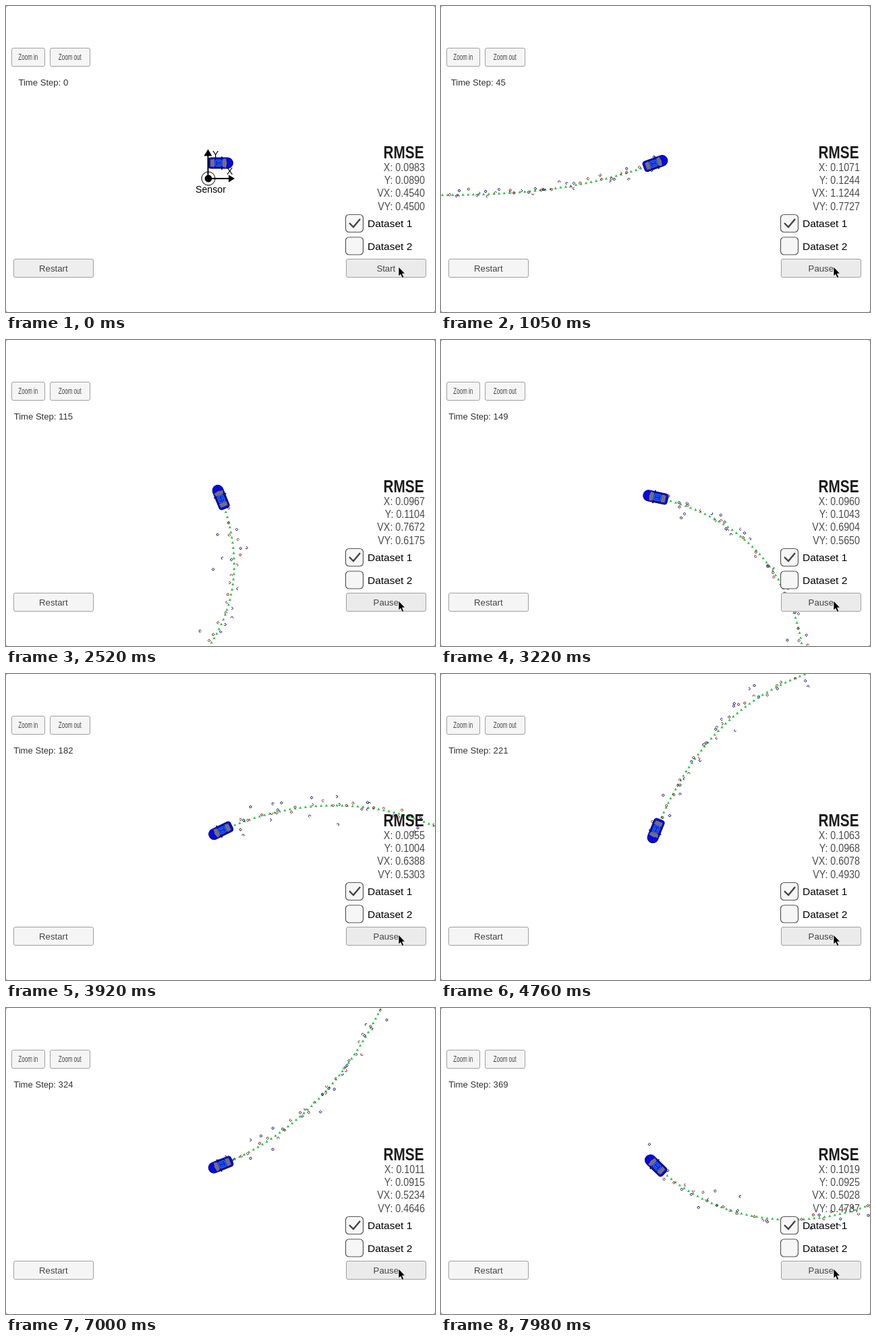
Animation of 636 by 454 pixels, one loop 8000 ms. Source, as an HTML page with a canvas:

```html
<!DOCTYPE html>
<html lang="en">
<head>
<meta charset="utf-8">
<title>Tracking simulator</title>
<style>
html, body { margin: 0; width: 100%; height: 100%; overflow: hidden; background: #fff; }
canvas { display: block; }
</style>
</head>
<body>
<canvas id="stage" width="636" height="454"></canvas>
<script>
const ctx = document.getElementById('stage').getContext('2d');
const LOOP = 8000, TICK = 70;
const CAR = { x: 318, y: 233 };
const STRIDE = 7.7, LAST = 369;
const FONT = '"Liberation Sans", Arial, sans-serif';
const AXES = ['X', 'Y', 'VX', 'VY'];

// Key moments: time in ms, time step, then the four RMSE values
const keys = [
  [1050, 45, 0.1071, 0.1244, 1.1244, 0.7727],
  [2520, 115, 0.0967, 0.1104, 0.7672, 0.6175],
  [3920, 182, 0.0955, 0.1004, 0.6388, 0.5303],
  [4760, 221, 0.1063, 0.0968, 0.6078, 0.4930],
  [6020, 278, 0.1000, 0.0902, 0.5502, 0.4448],
  [7980, 369, 0.1019, 0.0925, 0.5028, 0.4787]
];
const previousRun = [0.0983, 0.0890, 0.4540, 0.4500];

// Key headings: time step, degrees counter-clockwise
const headings = [[0, 0], [45, 20], [85, 57], [103, 92], [115, 112], [138, 153], [159, 180],
  [182, 206], [200, 229], [221, 248], [250, 251], [278, 246], [329, 196], [LAST, 136]];

function segment(table, x) {
  let i = 0;
  while (i < table.length - 2 && x > table[i + 1][0]) i++;
  return i;
}

function linear(table, x, col = 1) {
  const i = segment(table, x), a = table[i], b = table[i + 1];
  return a[col] + (b[col] - a[col]) * (x - a[0]) / (b[0] - a[0]);
}

// Cubic curve through the points, level at the first one
function smooth(table, x) {
  const slope = k => {
    const a = table[Math.max(k - 1, 0)], b = table[Math.min(k + 1, table.length - 1)];
    return k === 0 ? 0 : (b[1] - a[1]) / (b[0] - a[0]);
  };
  const i = segment(table, x), [x0, y0] = table[i], [x1, y1] = table[i + 1];
  const h = x1 - x0, u = (x - x0) / h, v = 1 - u;
  return v * v * (1 + 2 * u) * y0 + u * v * v * h * slope(i)
    + u * u * (3 - 2 * u) * y1 - u * u * v * h * slope(i + 1);
}

const clock = [[TICK, 1], ...keys];
const angle = s => smooth(headings, s) * Math.PI / 180;

// Summed squared errors run evenly between the key moments
const errors = [[0, 0, 0, 27, 0], ...keys.map(([, s, ...r]) => [s, ...r.map(v => s * v * v)])];
const errorAt = (step, i) => step ? Math.sqrt(linear(errors, step, i + 1) / step) : previousRun[i];

// Car positions relative to the sensor, with the drift of the summed steps removed
const path = [{ x: 18, y: -23 }];
for (let s = 1; s <= LAST; s++) {
  const a = angle(s - 0.5), p = path[s - 1];
  path.push({ x: p.x + STRIDE * Math.cos(a), y: p.y - STRIDE * Math.sin(a) });
}
const drift = { x: (-178 - path[278].x) / 278, y: (28 - path[278].y) / 278 };
path.forEach((p, s) => { p.x += drift.x * s; p.y += drift.y * s; });

let seed = 29;
function random() {
  seed = (seed * 16807) % 2147483647;
  return seed / 2147483647;
}
const gauss = () => (random() + random() + random() + random() - 2) * 1.7;

// Radar on odd steps errs in range and bearing, lidar on even steps in x and y
const readings = path.map(({ x, y }, s) => {
  const g = gauss(), h = gauss(), start = random() * 6.3, sweep = 3.6 + random() * 4;
  if (s % 2 === 0) return { x: x + 4 * g, y: y + 4 * h, start, sweep, color: '#7a1a1a' };
  const range = Math.hypot(x, y) + 7 * g, bearing = Math.atan2(y, x) + 0.026 * h;
  return { x: range * Math.cos(bearing), y: range * Math.sin(bearing), start, sweep, color: '#0c0c58' };
});

function text(str, x, y, size, { color = '#000', align = 'left', weight = '', squeeze = 1 } = {}) {
  ctx.save();
  ctx.translate(x, y);
  ctx.scale(squeeze, 1);
  ctx.font = `${weight} ${size}px ${FONT}`;
  ctx.textAlign = align;
  ctx.fillStyle = color;
  ctx.fillText(str, 0, 0);
  ctx.restore();
}

function shape(points, fill) {
  ctx.beginPath();
  points.forEach(([x, y]) => ctx.lineTo(x, y));
  ctx.closePath();
  ctx.fillStyle = fill;
  ctx.fill();
}

function box(x, y, w, h, r, fill, stroke, width = 1) {
  ctx.beginPath();
  ctx.roundRect(x, y, w, h, r);
  ctx.fillStyle = fill;
  ctx.fill();
  if (stroke) {
    ctx.strokeStyle = stroke;
    ctx.lineWidth = width;
    ctx.stroke();
  }
}

function line(points, color, width) {
  ctx.beginPath();
  points.forEach(([x, y]) => ctx.lineTo(x, y));
  ctx.strokeStyle = color;
  ctx.lineWidth = width;
  ctx.stroke();
}

function arc(x, y, r, start, sweep, color, width = 1) {
  ctx.beginPath();
  ctx.arc(x, y, r, start, start + sweep);
  ctx.strokeStyle = color;
  ctx.lineWidth = width;
  ctx.stroke();
}

function drawTrail(step) {
  for (let s = 1; s <= step; s++) {
    const { x, y } = path[s], r = readings[s];
    shape([[x, y - 2], [x + 2.1, y + 1.8], [x - 2.1, y + 1.8]], '#35c04c');
    arc(r.x, r.y, 1.6, r.start, r.sweep, r.color);
  }
}

function drawSensor() {
  arc(0, 0, 10, 0, 7, '#000');
  arc(0, 0, 2.7, 0, 7, '#000', 5.4);
  line([[-0.5, 0], [-0.5, -36]], '#000', 2);
  line([[0, 0], [32, 0]], '#000', 2);
  shape([[-0.5, -43.5], [5.5, -33.5], [-6.5, -33.5]], '#000');
  shape([[39, 0], [30, -5.5], [30, 5.5]], '#000');
  text('Y', 6, -31, 14);
  text('X', 27, -6, 14);
  text('Sensor', -19, 21, 14.2);
}

function drawCar(a) {
  ctx.save();
  ctx.translate(CAR.x, CAR.y);
  ctx.rotate(-a);
  box(1, -9.8, 2, 19.6, 0.5, '#101060');
  box(-18.5, -8, 37, 16, [4, 8, 8, 4], '#0808e0', '#0a0a70');
  shape([[-15, -5], [-9, -6], [-9, 6], [-15, 5]], '#70707c');
  shape([[3, -5.5], [8, -7], [9.5, 0], [8, 7], [3, 5.5]], '#70707c');
  box(-8, -4.5, 10, 9, 2, '#0a30d8', '#3a78f4');
  for (const side of [-1, 1]) {
    line([[-13, 6.8 * side], [5, 6.8 * side]], '#17174f', 1);
    line([[-5, 2 * side], [0, 2 * side]], '#3a78f4', 1);
  }
  ctx.restore();
}

function button(label, x, y, w, fill, { size = 13.2, dy = 18.5, squeeze = 1 } = {}) {
  box(x + 0.5, y + 0.5, w, 27, 2.5, fill, '#a0a0a0');
  text(label, x + w / 2 + 0.3, y + dy, size, { color: '#444', align: 'center', squeeze });
}

function checkbox(label, y, checked) {
  box(503.5, y, 26, 26, 5, '#f6f6f6', '#555', 1.2);
  if (checked) line([[509, y + 12.5], [515, y + 18.5], [525, y + 6.5]], '#444', 2.4);
  text(label, 536, y + 18.5, 15.5);
}

function drawPanel(step) {
  const narrow = { size: 12, dy: 18, squeeze: 0.67 };
  button('Zoom in', 8, 62, 49, '#f5f5f5', narrow);
  button('Zoom out', 65, 62, 59, '#f5f5f5', narrow);
  text('Time Step: ' + step, 55.3, 118, 13.1, { color: '#323232', align: 'center' });

  text('RMSE', 619.5, 225.5, 25, { align: 'right', squeeze: 0.83, color: '#1c1c1c', weight: 'bold' });
  AXES.forEach((name, i) => {
    const value = `${name}: ${errorAt(step, i).toFixed(4)}`;
    text(value, 621, 245 + 19.2 * i, 17, { align: 'right', squeeze: 0.84, color: '#4c4c4c' });
  });

  checkbox('Dataset 1', 309.5, true);
  checkbox('Dataset 2', 343, false);
  button('Restart', 11, 375, 118, step ? '#f5f5f5' : '#eeeeee');
  button(step ? 'Pause' : 'Start', 504, 375, 118, '#ebebeb');
}

function drawPointer() {
  const outline = [[582, 387], [582, 401], [585, 398.2], [587.5, 403.5], [589.8, 402.5],
    [587.4, 397.2], [591.5, 397]];
  shape(outline, '#000');
  line([...outline, outline[0]], '#fff', 0.7);
}

// Draws in sensor coordinates, with the car held at its place on the stage
function inWorld(here, paint) {
  ctx.save();
  ctx.translate(CAR.x - here.x, CAR.y - here.y);
  paint();
  ctx.restore();
}

function draw(time) {
  const t = Math.floor((time % LOOP) / TICK) * TICK;
  const step = t < TICK ? 0 : Math.round(linear(clock, t));
  const here = path[step];

  box(0, 0, 636, 454, 0, '#888');
  box(0, 0, 636, 454, 3, '#fff');
  inWorld(here, () => drawTrail(step));
  drawCar(angle(step));
  inWorld(here, drawSensor);
  drawPanel(step);
  drawPointer();
}

let begin;
function frame(now) {
  begin ??= now;
  draw(now - begin);
  requestAnimationFrame(frame);
}
draw(0);
requestAnimationFrame(frame);
</script>
</body>
</html>
```
